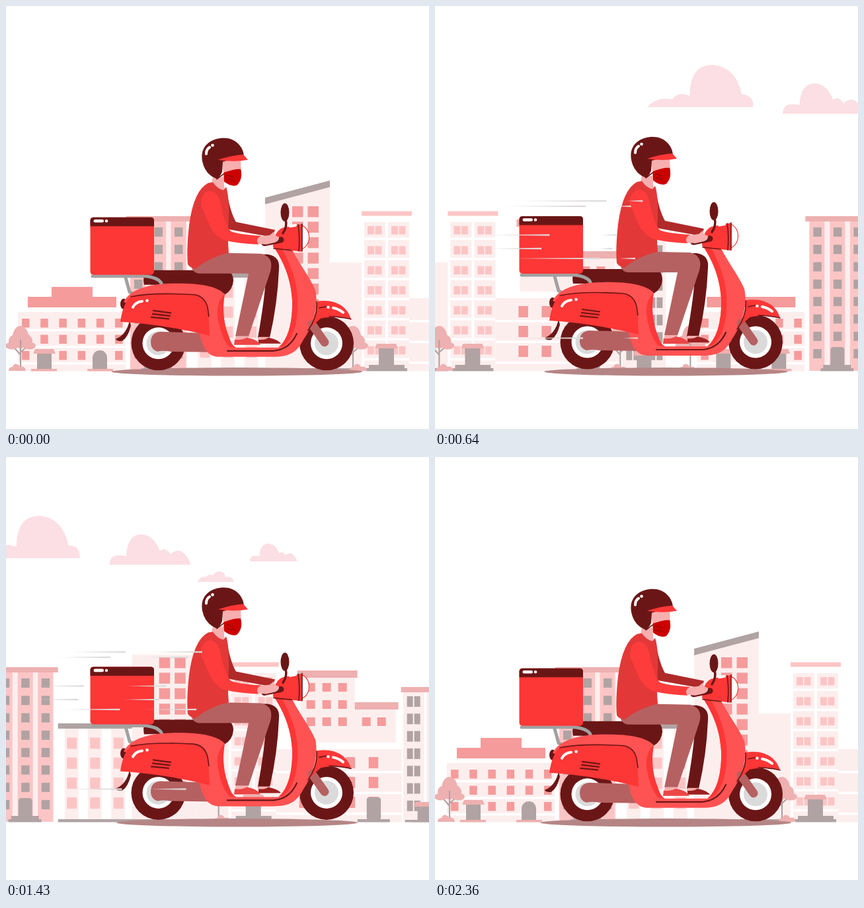
These frames come from a looping animation (640x640 px, 2.43 s). An HTML page:

```html
<!DOCTYPE html>
<html lang="en">
<head>
<meta charset="utf-8">
<title>Delivery ride</title>
<style>
html, body { margin: 0; width: 100%; height: 100%; overflow: hidden; background: #fff; }
svg { display: block; width: 100vw; height: 100vh; }
.red { fill: #fd3636; } .light { fill: #ff5252; } .dark { fill: #6b1616; }
.brown { fill: #b66161; } .skin { fill: #f7aeae; } .white { fill: #fff; }
.line { fill: none; stroke: #6b1616; stroke-width: 1.6; stroke-linecap: round; stroke-linejoin: round; }
.shine { fill: none; stroke: #fff; stroke-width: 4; stroke-linecap: round; }
.metal { fill: none; stroke: #a3a0a0; stroke-width: 5; stroke-linecap: round; stroke-linejoin: round; }
</style>
</head>
<body>
<svg viewBox="0 0 640 640">
  <defs>
    <linearGradient id="fade">
      <stop offset="0" stop-color="#dedada" stop-opacity="0"/>
      <stop offset=".45" stop-color="#dedada" stop-opacity=".8"/>
      <stop offset="1" stop-color="#dedada"/>
    </linearGradient>
  </defs>
  <g id="clouds" fill="#fbdfe4"></g>
  <g id="city"></g>
  <ellipse id="shadow" cx="349.5" cy="553.3" ry="6.2" fill="#b58585"/>
  <g id="ride">
    <path class="dark" d="M187 476Q182 498 166 504Q168 508 176 507Q185 501 189 484Z"/>
    <ellipse class="dark" cx="178" cy="451" rx="5" ry="8"/>
    <g id="wheel">
      <circle class="dark" cx="230.5" cy="510.5" r="41"/>
      <circle class="white" cx="230.5" cy="510.5" r="24"/>
      <circle cx="230.5" cy="510.5" r="18" fill="#dadada"/>
    </g>
    <use href="#wheel" x="254.5"/>
    <path class="brown" d="M234 493L300 495L312 524L248 523Q238 521 229 523Q219 520 219 509Q219 494 234 493Z"/>
    <path class="metal" d="M181 411L187 433L195 437"/>
    <path class="dark" d="M213 400H330Q344 401 344 416Q343 430 331 437Q312 421 209 422Q206 409 213 400Z"/>
    <path class="metal" d="M131 409H212Q228 411 234 418L238 426"/>

    <!-- far arm and far leg -->
    <path fill="#b02a2a" d="M333 276Q339 312 348 327L407 339L403 350L336 338Z"/>
    <path class="dark" d="M340 376L396 376Q415 379 413 398Q411 450 399 502H381Q392 440 393 410Z"/>
    <path class="skin" d="M382 501H399L398 506H381Z"/>

    <!-- scooter body -->
    <path class="light" d="M178 448C188 429 215 421 250 420C290 419 318 423 331 436C327 458 329 480 337 500Q341 514 348 517H412C428 505 434 475 433 445C431 410 418 385 406 366L433 369C444 391 459 409 468 430C473 452 466 482 450 505C441 523 430 531 405 531H322C304 531 297 515 293 496Z"/>
    <path class="red" d="M406 366C419 386 431 410 433 445C434 475 428 503 413 516L418 516C436 504 443 475 441 440C439 410 428 388 418 368Z"/>
    <path class="red" d="M331 436Q316 450 321 475Q326 503 338 516L348 517Q341 514 337 500C329 480 327 458 331 436Z"/>
    <path class="red" d="M173 478Q177 449 190 439Q225 434 285 437Q304 441 306 461L308 499Q240 482 173 478Z"/>
    <path class="line" d="M189 440Q225 433 285 437Q304 440 306 463L307 470"/>
    <path class="line" style="stroke-width:2.2" d="M223 461L249 464.500M222 466L248 469M220 471L246 473.500M335 522H405Q429 520 440 496"/>
    <path class="shine" d="M192 456Q196 448 206 447"/>
    <circle class="white" cx="213.500" cy="446" r="2.300"/>
    <path d="M463 482L482 509" fill="none" stroke="#b66161" stroke-width="13" stroke-linecap="round"/>
    <path class="red" d="M470 447C496 443 516 453 522 474C503 470 489 470 476 473L456 491C466 478 470 462 470 447Z"/>
    <path class="line" d="M522 474Q503 470 489 470M470 448Q472 470 457 491M474 457L484 455"/>
    <path class="shine" d="M495 457Q504 459 510 464"/>
    <circle class="white" cx="487.500" cy="456" r="2.200"/>

    <!-- near leg and shoes -->
    <path class="brown" d="M281 397Q306 377 337 374L386 375Q406 380 400 402L367 500H347L367 405H292Q284 404 281 397Z"/>
    <path class="skin" d="M348 500H367L365 506H346Z"/>
    <path d="M382 505Q391 506 397 502Q412 505 416 511H382Z" fill="#9c2020"/>
    <path d="M346 505Q357 506 364 502Q380 504 385 513H345Z" fill="#ec4646"/>

    <!-- headlight, mirror, grip -->
    <path d="M447 332A15 18.500 0 0 1 447 368Z" fill="#fff" stroke="#fd3636" stroke-width="1.2"/>
    <path class="red" d="M404 365Q405 342 418 336L448 330V372L407 367Z"/>
    <path class="line" d="M442 331Q445 350 443 371M448 330V371M405 367L432 370"/>
    <path class="shine" d="M430 333.500L438 332"/>
    <ellipse class="dark" cx="422" cy="312.500" rx="6.500" ry="13.800"/>
    <path class="line" style="stroke-width:3.500" d="M423 323Q426 334 419 344"/>
    <path class="line" style="stroke-width:9" d="M391 359L416 354"/>

    <!-- upper body -->
    <path class="skin" d="M313 259H329L331 281Q320 277 311 268Z"/>
    <path fill="#e33838" d="M306 268Q284 279 277 332Q273 368 275 391Q278 396 286 398Q310 379 337 374Q335 352 337 325Q338 288 333 274L329 279Q320 277 313 267Z"/>
    <path fill="#ff3c3c" d="M295 302Q295 281 309 280Q320 281 324 297Q331 331 340 341Q351 346 386 348L382 361Q342 359 327 353Q316 347 309 334Z"/>
    <path class="skin" d="M384 349L399 347L405 342L407 347L413 350Q414 355 407 358L394 361L381 360Q378 353 384 349Z"/>

    <!-- head -->
    <path class="skin" d="M326 233H355L356 253L330 260Z"/>
    <path class="line" d="M319 262L331 253"/>
    <path fill="#cc0000" d="M330 252Q347 246 355 247Q359 261 350 271Q342 275 330 266Q329 259 330 252Z"/>
    <path class="line" style="stroke-width:.8" d="M334 256L344 259M333 262L345 264"/>
    <path class="dark" d="M297 235C293 213 309 200 330 200C347 200 359 213 360 227L328 236L327 251Q324 259 319 262Q301 255 297 235Z"/>
    <path class="red" d="M321 233Q342 226 359 225L366 233Q345 237 321 233Z"/>
    <path class="shine" d="M303 224Q303 217 308 214"/>
    <circle class="white" cx="312.500" cy="211" r="2.300"/>

    <!-- cargo box -->
    <rect class="red" x="127.500" y="320" width="96.500" height="87" rx="5"/>
    <path class="dark" d="M127.500 333.500V325Q127.500 320 132.500 320H219Q224 320 224 325V333.500Z"/>
    <rect class="white" x="132.500" y="323.200" width="15.500" height="4.600" rx="2.300"/>
    <circle class="white" cx="152" cy="325.500" r="2.200"/>
  </g>
  <g id="wind" fill="url(#fade)"></g>
</svg>
<script>
const $ = id => document.getElementById(id);
const PALE = '#fdeeee', ROSE = '#eeb0b0', BLUSH = '#fcc5c5', PINK = '#f59b9b', GREY = '#b1a3a3';
const LOOP = 2430, LAST = 59, STREET = 1800, REPEAT = 897;

const box = (x, y, w, h, c, r = 0) =>
  `<rect x="${x}" y="${y}" width="${w}" height="${h}" fill="${c}" rx="${r}"/>`;
const shape = (d, c) => `<path d="${d}" fill="${c}"/>`;
const oval = (x, y, rx, ry) => `<ellipse cx="${x}" cy="${y}" rx="${rx}" ry="${ry}" fill="${ROSE}"/>`;
const place = (x, y, s) => `<g transform="translate(${x} ${y})">${s}</g>`;
const times = (n, f) => Array.from({ length: n }, (_, i) => f(i)).join('');
const grid = (xs, y, rows, step, w, h, c) =>
  times(rows, r => xs.map(x => box(x, y + r * step, w, h, c)).join(''));

const awningDoor = (x, y = 519) =>
  box(x, y + 6, 22, 550 - y - 6, GREY) +
  shape(`M${x - 3} ${y}h28l3 7h-34z`, ROSE) + box(x - 9, 549, 39, 3.500, ROSE);
const archDoor = x =>
  shape(`M${x} 550V532a11 11 0 0 1 22 0V550z`, GREY) + box(x - 8, 549, 39, 3.500, ROSE);
const steps = (x, w) => box(x + 4, 543, w - 8, 5, GREY) + box(x, 548, w, 4.500, GREY);

// A tree of three lobes; the bush stands at its foot.
const tree = ([x, top, spread, bush]) => place(x, 0,
  oval(0, top + 17, 12, 17) +
  '<path d="M0 550V505M0 528L-12 514M0 524L12 513" fill="none" stroke="#b1a3a3" stroke-width="2.200"/>' +
  [-1, 1].map(side =>
    oval(side * spread, 507, 7, 9) + oval(side * (spread + 2), 514, 10, 5.500)).join('') +
  shape(`M${bush - 13} 552q0-6 6-6q2-6 7-4q3 1 4 4q8-2 9 6z`, ROSE));

// One run of houses; the second run differs in a few roofs and doors.
function houses(second) {
  const lowHouse =
    (second ? '' : box(69, 425, 62, 16, PINK)) + box(33, 440, 134, 16, PINK) +
    box(18, 463, 163, 89.500, PALE) +
    grid([18], 489, 3, 25, 163, 3.500, '#fff') +
    grid([0, 1, 2, 3, 4, 5].map(i => 24 + i * 28.2), 473, 3, 24.5, 11.5, 13.5, PINK) +
    awningDoor(47) + (second ? awningDoor : archDoor)(131);

  const stripedTower =
    box(188, 326, 86, 226, PALE) +
    grid([188, 219, 249.5], 326, 1, 0, 23, 226, BLUSH) +
    grid([194, 224.5, 255], 335, 8, 26.3, 12.5, 14, GREY) +
    box(182, 318, 98, 8, ROSE) +
    shape('M220 543V521q0-5 5-5h11q5 0 5 5V543z', GREY) + steps(205, 50);

  const columns =
    box(280, 403, 112, 8, GREY) +
    grid([290, 325, 360.5], 411, 1, 0, 21, 137, PALE) +
    grid([293.5, 328.5, 364], 424.5, 4, 30.2, 15, 17, BLUSH);

  const office =
    shape(second ? 'M392 299H490V552H392z' : 'M392 298L490 272V552H392z', PALE) +
    (second ? '' : shape('M392 290L490 264V274L392 300z', GREY)) +
    grid([433, 456.5], 303, 9, 23.4, 16.5, 16.5, PINK) +
    box(490, 388, 48, 164, PALE) + box(280, 548, 258, 4.500, GREY);

  const twin =
    box(542, 327, 68, 225, PALE) + box(574, 327, 4, 225, '#fff') +
    grid([542], 350.5, 7, 30.4, 68, 3.5, '#fff') +
    grid([547, 558.5, 583, 594.5], 333, 7, 30.3, 10, 12.5, BLUSH) +
    box(538, 310.500, 76, 7, BLUSH) +
    box(564, 517, 23, 28, GREY) + shape('M561 511h29l3 7h-35z', ROSE) + steps(545, 62);

  const terrace =
    box(647, 334, 82, 98, PALE) + box(729, 382, 62, 50, PALE) +
    box(642, 323, 91, 11, ROSE) + box(729, 371, 66, 11, ROSE) +
    grid([656, 680, 704], 342, 3, 26, 13, 13, PINK) +
    grid([740, 763], 394, 1, 0, 13, 13, PINK) +
    box(610, 442, 190, 110.5, PALE) + grid([610], 475, 3, 31.5, 190, 3.5, '#fff') +
    grid([645, 680, 715, 750], 454, 3, 30, 14.5, 17, PINK) +
    box(747, 515, 21.5, 34, GREY, 4) + box(733, 548, 49, 4.500, GREY);

  const grayTower =
    box(802, 356, 66, 196, PALE) + box(834, 356, 3.500, 196, '#fff') +
    grid([808, 819, 843, 854], 362, 7, 26.3, 9, 16, GREY) +
    (second ? box(799, 348, 74, 8, ROSE) : '') +
    awningDoor(824, 522) + box(805, 549, 62, 3.500, GREY);

  return lowHouse + stripedTower + columns + office + twin + terrace + grayTower;
}

const trees = [[22, 484, 11, -5], [525, 484, 11, 8], [799, 477, 16, -3], [905, 483, 11, -5], [1420, 484, 12, 5]];
const street = houses(false) + place(REPEAT, 0, houses(true)) + trees.map(tree).join('') +
  shape('M1768 552Q1768 540 1773 541Q1776 546 1783 546V552z', ROSE);
$('city').innerHTML = `<g id="street">${street}</g><use href="#street" x="${STREET}"/>`;

const big = 'M0 64Q12 48 38 52Q46 39 64 47Q64 0 99 0Q134 3 143 45Q161 45 160 64z';
const small = 'M0 46Q0 27 25 33Q27 0 48 0Q67 1 76 25Q84 18 92 30Q98 24 107 25Q119 32 123 46z';
const tiny = 'M0 16Q4 7 13 8Q17 3 23 6Q27 0 33 0Q41 1 42 8Q53 7 55 16z';
const cloud = (x, y, d, s = 1) => `<path transform="translate(${x} ${y}) scale(${s})" d="${d}"/>`;
$('clouds').innerHTML = cloud(652, 89, big) + cloud(857, 117, small) +
  cloud(990, 173, tiny) + cloud(1069, 131, small, .585);

// y, start of the track, then head positions along its life
const gusts = [
  [295, 82, 164, 276, 293], [303, 65, 143, 243, 271], [346.5, 45, 106, 185, 235],
  [367, 40, 98, 172, 224], [382, 70, 156, 265, 285], [502.5, 78, 165, 234, 265]
];
function along(keys, p) {
  const i = keys.findIndex(k => k[0] > p);
  if (i < 0) return keys[keys.length - 1][1];
  if (!i) return keys[0][1];
  const [a, x] = keys[i - 1], [b, y] = keys[i];
  return x + (y - x) * (p - a) / (b - a);
}
function gust([y, x0, h0, h1, h2], p) {
  const head = along([[-.22, x0], [0, h0], [.63, h1], [1, h2], [1.63, Math.max(h2, x0 + 236)]], p);
  const tail = along([[0, x0], [.63, x0 + 30], [1, x0 + 115], [1.63, x0 + 220], [1.75, x0 + 250]], p);
  return head - tail < 3 ? '' : `<path d="M${tail} ${y}L${head} ${y - 1.3}V${y + 1.3}z"/>`;
}

function draw(now) {
  const t = Math.floor(now % LOOP / 10) * 10;
  const step = Math.floor((t + 5) * .014);
  const n = Math.ceil(step * 25 / 14);

  $('city').setAttribute('transform', `translate(${-STREET * n / LAST} 0)`);
  $('clouds').setAttribute('transform', `translate(${-19.45 * n} 0)`);

  // bounce: ten frames up, ten down, with a slightly shorter last fall
  const lift = n >= 50 ? (LAST - n) / 9 : 1 - Math.abs(n % 20 - 10) / 10;
  $('ride').setAttribute('transform', `translate(0 ${-.2 - 6 * lift})`);
  $('shadow').setAttribute('rx', 190 - 19 * lift);

  const q = ((n - 22) * .2925 % 1 + 1) % 1;
  $('wind').innerHTML = n % LAST
    ? gusts.map(g => [q - 1, q, q + 1].map(p => gust(g, p)).join('')).join('') : '';
}

const start = performance.now();
function tick() {
  draw(performance.now() - start);
  requestAnimationFrame(tick);
}
tick();
</script>
</body>
</html>
```
